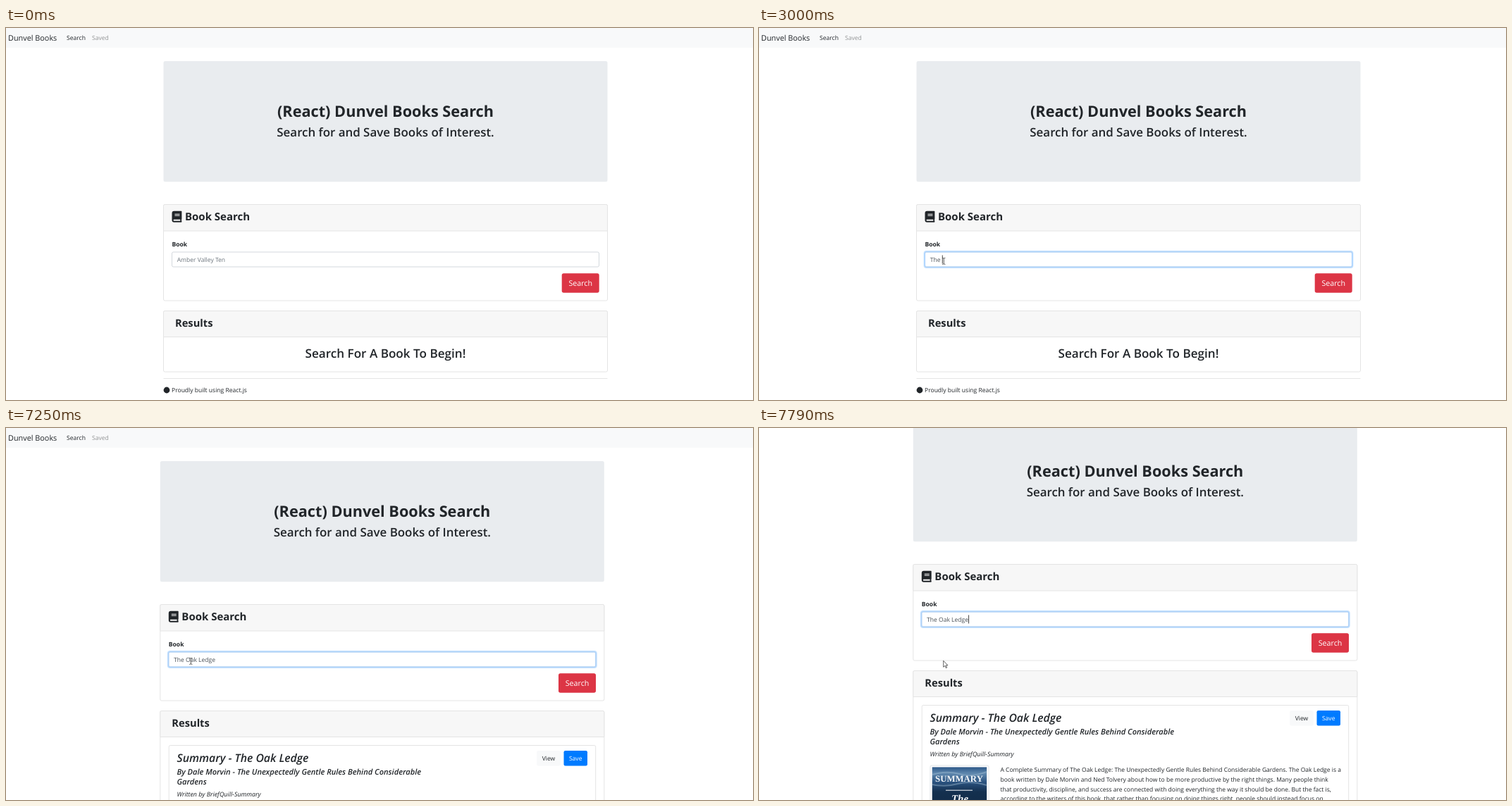
These frames come from a looping animation (1060 by 528 pixels, 8000 ms). An HTML page:

```html
<!DOCTYPE html>
<html lang="en">
<head>
<meta charset="utf-8">
<title>Book search</title>
<style>
html, body { margin: 0; width: 100%; height: 100%; overflow: hidden; background: #fff; }
svg { display: block; }
text { font: 8.55px "Open Sans", "Noto Sans", sans-serif; fill: #212529; white-space: pre; text-rendering: geometricPrecision; }
.mid { text-anchor: middle; }
.bold { font-weight: 700; }
.semi { font-weight: 600; }
.it { font-style: italic; }
.white { fill: #fff; }
.card { fill: #fff; stroke: #e4e4e4; }
.head { fill: #f7f7f7; stroke: #e4e4e4; }
.cover { font: 700 12.8px "Liberation Serif", serif; fill: #f4f7fa; }
</style>
</head>
<body>
<svg width="1060" height="528" viewBox="0 0 1060 528">
  <defs>
    <linearGradient id="sea" x2="0" y2="1">
      <stop offset="0" stop-color="#2c5788"/>
      <stop offset=".07" stop-color="#5f88ae"/>
      <stop offset=".17" stop-color="#2a527f"/>
      <stop offset=".28" stop-color="#14304f"/>
      <stop offset="1" stop-color="#0a1a30"/>
    </linearGradient>
  </defs>

  <g id="nav">
    <rect width="1060" height="28" fill="#f8f9fa"/>
    <text x="3" y="17.8" style="font-size:10.85px">Dunvel Books</text>
    <text x="86" y="16.7">Search</text>
    <text x="122" y="16.7" style="fill:#929495">Saved</text>
  </g>

  <g id="page">
    <rect x="223.5" y="47" width="630" height="171.3" rx="2.5" fill="#e9ecef"/>
    <text class="mid bold" x="538.5" y="126.3" style="font-size:21.7px">(React) Dunvel Books Search</text>
    <text class="mid semi" x="538.5" y="153.5" style="font-size:16.9px">Search for and Save Books of Interest.</text>

    <rect class="card" x="223.5" y="250.5" width="630" height="136.5" rx="2"/>
    <path class="head" d="M223.5 288v-35.5q0-2 2-2h626q2 0 2 2v35.5z"/>
    <g transform="translate(235.5 259.8) scale(.031)" fill="#212529">
      <path fill-rule="evenodd" d="M448 360V24q0-24-24-24H96Q0 0 0 96v320q0 96 96 96h328q24 0 24-24v-16q0-12-9-19-5-37 0-74 9-7 9-19zM128 128h224v32H128zm0 64h224v32H128zm253 256H96a32 32 0 0 1 0-64h285q-3 32 0 64z"/>
    </g>
    <text class="bold" x="254" y="273.2" style="font-size:15px">Book Search</text>
    <text class="bold" x="235.5" y="309.7">Book</text>
    <rect id="ring" x="234.8" y="317.3" width="607.4" height="22.4" rx="2.8" fill="none" stroke="#bfdeff" stroke-width="2.4"/>
    <rect x="235.5" y="318" width="606" height="21" rx="2" fill="#fff" stroke="#d3d8dd"/>
    <rect id="focus" x="235.5" y="318" width="606" height="21" rx="2" fill="none" stroke="#a3cfff"/>
    <text id="field" x="242.7" y="332.2" xml:space="preserve"></text>
    <rect id="caret" y="322.5" width=".9" height="12" fill="#333"/>
    <rect x="788.7" y="348.2" width="53" height="27.5" rx="2.7" fill="#dc3545"/>
    <text class="mid white" x="815.2" y="366.4" style="font-size:10.7px">Search</text>

    <rect id="results" class="card" x="223.5" y="401.5" width="630" height="86.5" rx="2"/>
    <path class="head" d="M223.5 438.5v-35q0-2 2-2h626q2 0 2 2v35z"/>
    <text class="bold" x="240" y="424.2" style="font-size:14.7px">Results</text>

    <g id="empty">
      <text class="mid semi" x="538.5" y="468.3" style="font-size:17.1px">Search For A Book To Begin!</text>
      <path d="M223.5 497.5h630" stroke="#e5e5e5"/>
      <circle cx="228" cy="514" r="4.4" fill="#212529"/>
      <text x="235" y="517">Proudly built using React.js</text>
    </g>

    <g id="found" transform="translate(4.7 0)">
      <rect class="card" x="231.2" y="450.5" width="605.5" height="260" rx="2"/>
      <text class="semi it" x="242.5" y="473.6" style="font-size:15.8px">Summary - The Oak Ledge</text>
      <text class="semi it" x="242.5" y="492.3" style="font-size:11.1px">By Dale Morvin - The Unexpectedly Gentle Rules Behind Considerable</text>
      <text class="semi it" x="242.5" y="505.9" style="font-size:11.1px">Gardens</text>
      <text class="it" x="242.5" y="523" style="font-size:8.9px">Written by BriefQuill-Summary</text>
      <rect x="753.2" y="458" width="33.7" height="21.4" rx="2.2" fill="#f8f9fa"/>
      <text class="mid" x="770" y="471.8">View</text>
      <rect x="791.5" y="458" width="33.5" height="21.4" rx="2.2" fill="#007bff"/>
      <text class="mid white" x="808.2" y="471.8">Save</text>
      <rect x="243" y="536" width="83" height="130" rx="2" fill="#fff" stroke="#dee2e6"/>
      <rect x="245.7" y="538.4" width="77.5" height="125" fill="url(#sea)"/>
      <path d="M246 549q20-6 38-1t39-3M246 563q18 4 36-1t41 2" fill="none" stroke="#a9c3d8" stroke-opacity=".4" stroke-width="2"/>
      <text class="mid cover" x="284" y="558.5">SUMMARY</text>
      <path d="M265 571.2h38" stroke="#fff"/>
      <text class="mid cover" x="285" y="588" style="font-size:15px;font-style:italic">The</text>
      <g id="blurb"></g>
    </g>
  </g>

  <circle id="click" cx="262" cy="330" r="6" fill="#fff032" style="mix-blend-mode:multiply"/>
  <path id="beam" d="M260.3 326.3q2 0 2 1.2v6.8q0 1.2-2 1.2M264.3 326.3q-2 0-2 1.2M264.3 335.5q-2 0-2-1.2" fill="none" stroke="#333" stroke-width=".8"/>
  <path id="arrow" d="M0 0v9l2.1-1.9 1.5 3.3 1.4-.6-1.5-3.2h2.8z" fill="#fff" stroke="#222" stroke-width=".7"/>
</svg>
<script>
const $ = id => document.getElementById(id);
const LOOP = 8000, CLICK = 1600, FOUND = 6560, SCROLL = 7480;
const QUERY = "The Oak Ledge", HINT = "Amber Valley Ten";
const keyTimes = [2600, 2750, 2830, 3000, 3300, 3530, 3610, 3690, 4240, 4320, 4390, 4540, 4620];
const caretFlips = [1600, 2140, 2600, 5170, 5630, 6180, 6720, 7250, 7790];
const blurb = [
  "A Complete Summary of The Oak Ledge: The Unexpectedly Gentle Rules Behind Considerable Gardens. The Oak Ledge is a",
  "book written by Dale Morvin and Ned Tolvery about how to be more productive by the right things. Many people think",
  "that productivity, discipline, and success are connected with doing everything the way it should be done. But the fact is,",
  "according to the writers of this book, that rather than focusing on doing things right, people should instead focus on"
];
$("blurb").innerHTML = blurb.map((line, i) =>
  `<text x="342.5" y="${545.4 + i * 13.6}" style="font-size:8.5px">${line}</text>`).join("");

const clamp = (v, lo, hi) => Math.min(hi, Math.max(lo, v));
const passed = (times, t) => times.filter(at => t >= at).length;
const show = (id, on) => $(id).style.display = on ? "" : "none";
const move = (id, x, y) => $(id).setAttribute("transform", `translate(${x} ${y})`);

function drawPointer(t) {
  const p = clamp(Math.floor((t - 520) / 76) / 10, 0, 1);
  const left = 1 - (1 - p) ** 2;
  const x = 602 - 340 * left, y = 441 - 111 * left;
  const late = t >= 7700;
  const overField = y < 339;
  show("arrow", t >= 520 && (!overField || late));
  move("arrow", late ? 261.7 : x, late ? 330.3 : y);
  show("beam", overField && !late);
  move("beam", x - 262, y - 330);
  show("click", t >= CLICK && t < 1760);
}

function drawField(t) {
  const typed = QUERY.slice(0, passed(keyTimes, t));
  const field = $("field");
  field.textContent = typed || HINT;
  field.style.fill = typed ? "#495057" : "#6c757d";
  const width = typed ? field.getComputedTextLength() : 0;
  $("caret").setAttribute("x", 242.8 + width);
  show("caret", passed(caretFlips, t) % 2);
  const step = Math.floor(t / 80) * 80;
  const glow = t < CLICK ? 0 : clamp((step - 1560) / 200, 0, 1);
  $("ring").style.opacity = $("focus").style.opacity = glow;
}

function draw(now) {
  const t = now % LOOP;
  const found = t >= FOUND;
  const k = clamp(Math.floor((t - SCROLL) / 77) + 1, 0, 4);
  const scroll = 57 * (1 - (1 - k / 4) ** 2.9);
  move("nav", 0, -scroll);
  move("page", found ? -4.7 : 0, -scroll);
  show("found", found);
  show("empty", !found);
  $("results").setAttribute("height", found ? 400 : 86.5);
  drawField(t);
  drawPointer(t);
}

const start = performance.now();
function tick() {
  draw(performance.now() - start);
  requestAnimationFrame(tick);
}
tick();
</script>
</body>
</html>
```
